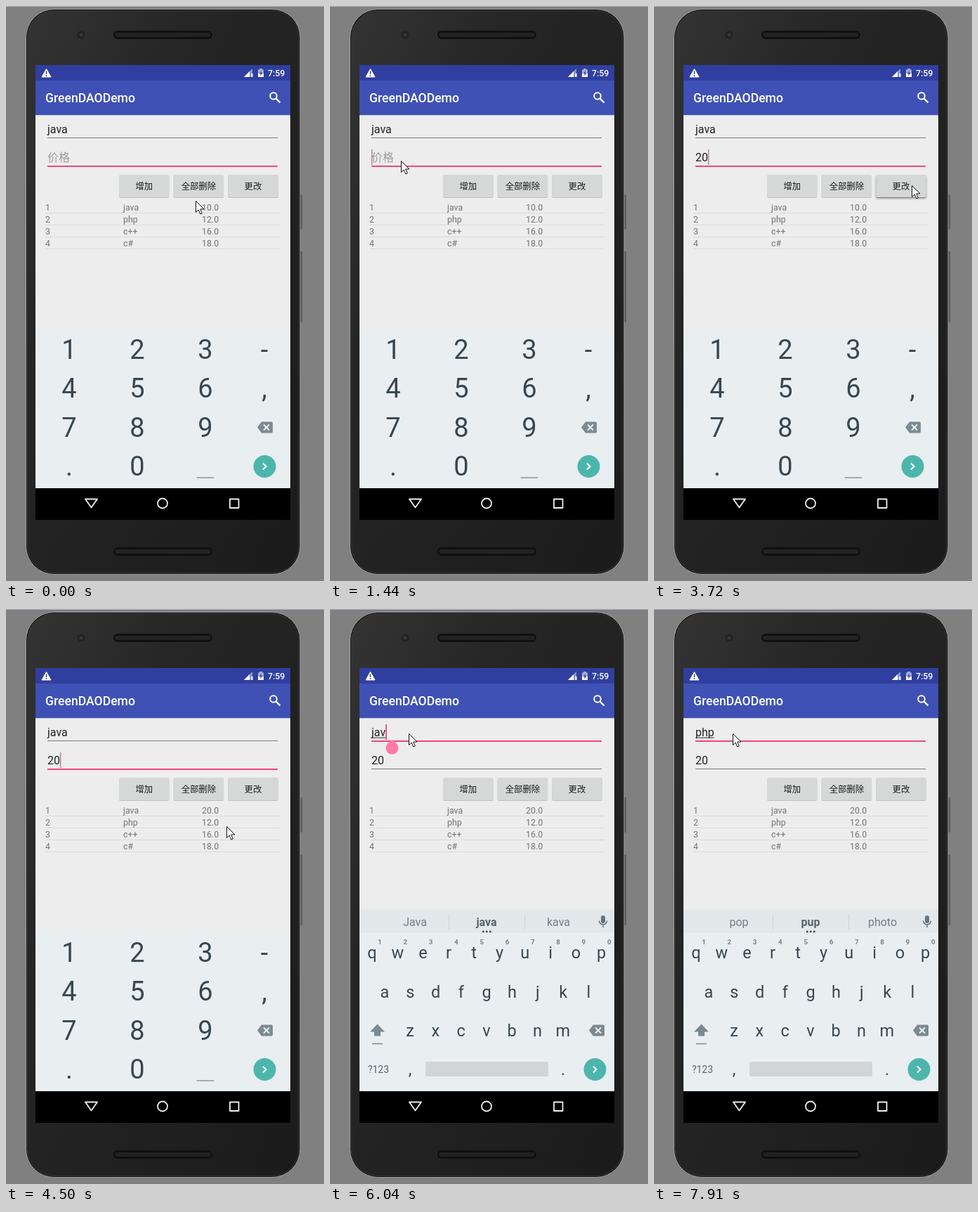
An HTML page for the animation above (8 s loop, 453 px wide and 818 px high).

```html
<!DOCTYPE html>
<html lang="zh">
<head>
<meta charset="utf-8">
<title>GreenDAODemo</title>
<style>
html, body { margin: 0; width: 100%; height: 100%; overflow: hidden; background: #808080; }
svg { display: block; width: 453px; height: 818px; font-family: Roboto, "Noto Sans CJK SC", "Noto Sans CJK", sans-serif; }
text { white-space: pre; }
.mid { text-anchor: middle; }
.field { font-size: 16px; fill: #212121; }
.hint { font-size: 16px; fill: #9c9c9c; }
.list { font-size: 12.35px; fill: #737373; }
.btn { font-size: 12.35px; fill: #1c1c1c; text-anchor: middle; }
.num { font-size: 38px; fill: #37474f; text-anchor: middle; }
.key { font-size: 23.5px; fill: #37474f; text-anchor: middle; }
.sup { font-size: 9.8px; font-weight: 700; fill: #74858d; text-anchor: middle; }
.word { font-size: 16px; fill: #6f7f86; text-anchor: middle; }
#w1 { font-weight: 700; fill: #52646c; }
#mouse { animation: mouse 8s step-end infinite; }
@keyframes mouse {
  0% { transform: translate(270px, 277px); }
  2% { transform: translate(285px, 282px); }
  3.75% { transform: translate(262px, 276px); }
  5.5% { transform: translate(214px, 261px); }
  7.375% { transform: translate(170px, 247px); }
  9.25% { transform: translate(142px, 238px); }
  11.125% { transform: translate(130px, 234px); }
  12.75% { transform: translate(112px, 226px); }
  14.625% { transform: translate(102px, 221px); }
  16.125% { transform: translate(101px, 220px); }
  36.25% { transform: translate(142px, 224px); }
  37.875% { transform: translate(224px, 236px); }
  39.5% { transform: translate(305px, 247px); }
  41.375% { transform: translate(352px, 253px); }
  43% { transform: translate(367px, 255px); }
  52.625% { transform: translate(360px, 268px); }
  54.375% { transform: translate(338px, 294px); }
  56.25% { transform: translate(314px, 309px); }
  58.125% { transform: translate(300px, 311px); }
  59.625% { transform: translate(276px, 290px); }
  61.25% { transform: translate(215px, 245px); }
  62.875% { transform: translate(152px, 199px); }
  64.625% { transform: translate(120px, 180px); }
  66.375%, 100% { transform: translate(112px, 177px); }
}
</style>
</head>
<body>
<svg viewBox="0 0 453 818">
  <defs>
    <linearGradient id="shell" x1="0" y1="0" x2="1" y2="1">
      <stop offset="0" stop-color="#343434"/>
      <stop offset=".3" stop-color="#262626"/>
      <stop offset="1" stop-color="#1b1b1b"/>
    </linearGradient>
    <filter id="blur" x="-20%" y="-40%" width="140%" height="180%"><feGaussianBlur stdDeviation="1.5"/></filter>
    <g id="slot">
      <rect x="153" width="141" height="12" rx="6" fill="#101010"/>
      <rect x="155.5" y="3" width="136" height="6" rx="3" fill="#222"/>
    </g>
    <g id="erase">
      <path d="M-11 0L-5 -8H9Q11 -8 11 -6V6Q11 8 9 8H-5Z" fill="#7b8a90"/>
      <path d="M-2 -4L6 4M6 -4L-2 4" stroke="#eceff1" stroke-width="2"/>
    </g>
    <g id="enter">
      <circle r="16" fill="#4db6ac"/>
      <path d="M-2.5 -4.5L2 0L-2.5 4.5" fill="none" stroke="#fff" stroke-width="2"/>
    </g>
  </defs>

  <rect width="453" height="818" fill="#808080"/>
  <rect width="453" height="1" fill="#a4b6c5"/>

  <!-- phone -->
  <rect x="417" y="268" width="5" height="50" rx="1.5" fill="#5b5b5b"/>
  <rect x="417" y="349" width="5" height="101" rx="1.5" fill="#5b5b5b"/>
  <rect x="28.5" y="4.5" width="390.5" height="804" rx="40" fill="#111" stroke="#a0a0a0"/>
  <rect x="30.5" y="6.5" width="386.5" height="800" rx="38" fill="url(#shell)" stroke="#383838"/>
  <circle cx="107" cy="41" r="5.5" fill="#222"/>
  <circle cx="107" cy="41" r="2.5" fill="#383845"/>
  <use href="#slot" y="35"/>
  <use href="#slot" y="770"/>

  <!-- app bars -->
  <rect x="42" y="84" width="363" height="647" fill="#ededed"/>
  <rect x="42" y="84" width="363" height="22" fill="#303f9f"/>
  <rect x="42" y="106" width="363" height="49" fill="#3f51b5"/>
  <rect x="42" y="155" width="363" height="1" fill="#c6c8d6"/>
  <path d="M57.5 89.5L64 101H51Z" fill="#fff" stroke="#fff" stroke-linejoin="round"/>
  <path d="M57.5 92.5V97M57.5 98.3V100" stroke="#303f9f" stroke-width="1.5"/>
  <path d="M351 89V101H339Z" fill="#8993cb"/>
  <path d="M347 93V101H339ZM349.5 96h2v5h-2z" fill="#fff"/>
  <path d="M361 89h4v1.5h2V101h-8V90.5h2z" fill="#a4abd7"/>
  <path d="M359 96h8v5h-8z" fill="#fff"/>
  <path d="M364 91.5L360.8 96.5H363L362 100L365.5 95H363.3Z" fill="#303f9f"/>
  <text x="373" y="100" font-size="12.35" font-weight="500" fill="#fff">7:59</text>
  <text x="56" y="137" font-size="17.6" font-weight="500" fill="#fff">GreenDAODemo</text>
  <g fill="none" stroke="#fff" stroke-width="2">
    <circle cx="381" cy="128" r="4.8"/>
    <path d="M384.5 131.5L390.5 137.5" stroke-width="2.4"/>
  </g>

  <!-- form -->
  <rect x="59" y="187" width="328" height="1" fill="#7a7a7a"/>
  <rect x="59" y="227" width="328" height="1" fill="#7a7a7a"/>
  <rect data-on="5310-8000" x="59" y="187" width="328" height="2" fill="#f8427f"/>
  <rect data-on="0-5460" x="59" y="227" width="328" height="2" fill="#f8427f"/>
  <text data-on="6310-6890" class="hint" x="59" y="181">名称</text>
  <text data-on="0-2220" class="hint" x="59" y="221">价格</text>
  <text id="name" class="field" x="59" y="181"></text>
  <text id="price" class="field" x="59" y="221"></text>
  <rect id="under" data-on="5610-8000" x="59" y="182.6" height="1" fill="#333"/>
  <rect id="caret1" data-on="5460-7910" y="164" width="2" height="22" fill="#f0568b"/>
  <rect id="caret2" data-on="440-890 1440-1970 2220-3030 3440-3970 4500-4900" y="204" width="1.3" height="22" fill="#b9738d"/>
  <path data-on="5460-6160" d="M88.5 186L95 191.5A9 9 0 1 1 82 191.5Z" fill="#ff79a6"/>
  <g id="buttons"></g>
  <g id="rows"></g>

  <!-- keyboards -->
  <rect x="42" y="460.5" width="363" height="225.5" fill="#e9eef1"/>
  <g id="digits" data-on="0-5610">
    <path d="M271.5 671H296" stroke="#87969c" stroke-width="1.5"/>
    <use href="#erase" x="369" y="599.5"/>
    <use href="#enter" x="368.5" y="655"/>
  </g>
  <g id="letters" data-on="5610-8000">
    <rect x="42" y="427.5" width="363" height="33" fill="#e2e7ea"/>
    <path d="M169.5 434V456M277.5 434V456" stroke="#cdd4d8"/>
    <text id="w0" class="word" x="121" y="451"></text>
    <text id="w1" class="word" x="223" y="451"></text>
    <text id="w2" class="word" x="325.5" y="451"></text>
    <path d="M217 459h2.5M222 459h2.5M227 459h2.5" stroke="#37474f" stroke-width="2.5"/>
    <rect x="386" y="436" width="6" height="11" rx="3" fill="#65757c"/>
    <path d="M383.5 443.5a5.5 5.5 0 0 0 11 0M389 449V453" fill="none" stroke="#65757c" stroke-width="1.5"/>
    <path d="M67.5 590.5L78 601.5H72V607.5H63V601.5H57Z" fill="#7b8a90"/>
    <path d="M60 618.5H75" stroke="#7b8a90" stroke-width="1.5"/>
    <use href="#erase" x="380" y="599.5"/>
    <text class="mid" x="69" y="660" font-size="14" fill="#56676f">?123</text>
    <rect x="136" y="644" width="175" height="21" rx="2" fill="#d1d5d8"/>
    <use href="#enter" x="377.5" y="655"/>
  </g>

  <!-- navigation -->
  <rect x="42" y="686" width="363" height="45" fill="#000"/>
  <g fill="none" stroke="#eee" stroke-width="1.8" stroke-linejoin="round">
    <path d="M113 701.5H130L121.5 713.5Z"/>
    <circle cx="223" cy="707.5" r="7"/>
    <rect x="319" y="701.5" width="12.5" height="12.5"/>
  </g>

  <path id="mouse" d="M.5 .5V16.5L4.200 13L6.800 19L9.300 18L6.700 12H12Z" fill="#fff" stroke="#111"/>
</svg>
<script>
const $ = id => document.getElementById(id);

function add(parent, tag, attrs, content = '') {
  const el = document.createElementNS('http://www.w3.org/2000/svg', tag);
  for (const key in attrs) el.setAttribute(key, attrs[key]);
  el.textContent = content;
  return $(parent).appendChild(el);
}
const label = (parent, cls, x, y, content) => add(parent, 'text', { class: cls, x, y }, content);

['增加', '全部删除', '更改'].forEach((name, i) => {
  const x = 161 + 77.6 * i;
  const box = { x, y: 240, width: 71.5, height: 32, rx: 2 };
  add('buttons', 'rect', { ...box, y: 241, fill: '#000', opacity: .2 });
  if (i === 2) {
    add('buttons', 'rect', { ...box, y: 242, fill: '#000', opacity: .35, filter: 'url(#blur)', 'data-on': '3720-3970' });
  }
  add('buttons', 'rect', { ...box, fill: '#d6d7d7' });
  label('buttons', 'btn', x + 35.75, 261, name);
});

let cost;
[['java', '10.0'], ['php', '12.0'], ['c++', '16.0'], ['c#', '18.0']].forEach(([lang, value], i) => {
  const y = 290.5 + 17.1 * i;
  label('rows', 'list', 56, y, i + 1);
  label('rows', 'list', 167, y, lang);
  const cell = label('rows', 'list', 279, y, value);
  cost = cost || cell;
  add('rows', 'rect', { x: 56, y: 294 + 17 * i, width: 335, height: 1, fill: '#dadada' });
});

['123-', '456,', '789', '.0'].forEach((row, r) => {
  [...row].forEach((c, i) => label('digits', 'num', [90, 187, 284, 368][i], 502 + 55.4 * r, c));
});

const pitch = 36.3;
['qwertyuiop', 'asdfghjkl', 'zxcvbnm'].forEach((row, r) => {
  [...row].forEach((c, i) => label('letters', 'key', [60, 78, 114][r] + pitch * i, 497 + 55.5 * r, c));
});
[...'1234567890'].forEach((c, i) => label('letters', 'sup', 71 + pitch * i, 477, c));
label('letters', 'key', 114, 663, ',');
label('letters', 'key', 332, 663, '.');

// Each track holds [start in ms, value] steps.
const tracks = {
  name: [[0, 'java'], [6040, 'jav'], [6160, 'ja'], [6310, ''], [6890, 'p'], [7040, 'ph'], [7180, 'php']],
  price: [[0, ''], [2220, '2'], [2500, '20']],
  cost: [[0, '10.0'], [3970, '20.0']],
  words: [[0, 'Java java kava'], [6310, 'Jan ja kava'], [6620, 'The I This'], [7040, 'pm p put'], [7320, 'pop pup photo']]
};
const valueAt = (track, t) => track.filter(([start]) => start <= t).pop()[1];

const timed = [...document.querySelectorAll('[data-on]')].map(el => ({
  el, spans: el.dataset.on.split(' ').map(span => span.split('-').map(Number))
}));

function setText(el, value) {
  if (el.textContent !== value) el.textContent = value;
}
const widthOf = el => el.textContent ? el.getComputedTextLength() : 0;

const begin = performance.now();
function draw() {
  const t = (performance.now() - begin) % 8000;
  setText($('name'), valueAt(tracks.name, t));
  setText($('price'), valueAt(tracks.price, t));
  setText(cost, valueAt(tracks.cost, t));
  valueAt(tracks.words, t).split(' ').forEach((word, i) => setText($('w' + i), word));

  for (const { el, spans } of timed) {
    el.style.display = spans.some(([from, to]) => t >= from && t < to) ? '' : 'none';
  }
  const nameWidth = widthOf($('name'));
  $('under').setAttribute('width', nameWidth);
  $('caret1').setAttribute('x', Math.round(58.6 + nameWidth));
  $('caret2').setAttribute('x', 59 + widthOf($('price')));
  requestAnimationFrame(draw);
}
draw();
</script>
</body>
</html>
```
